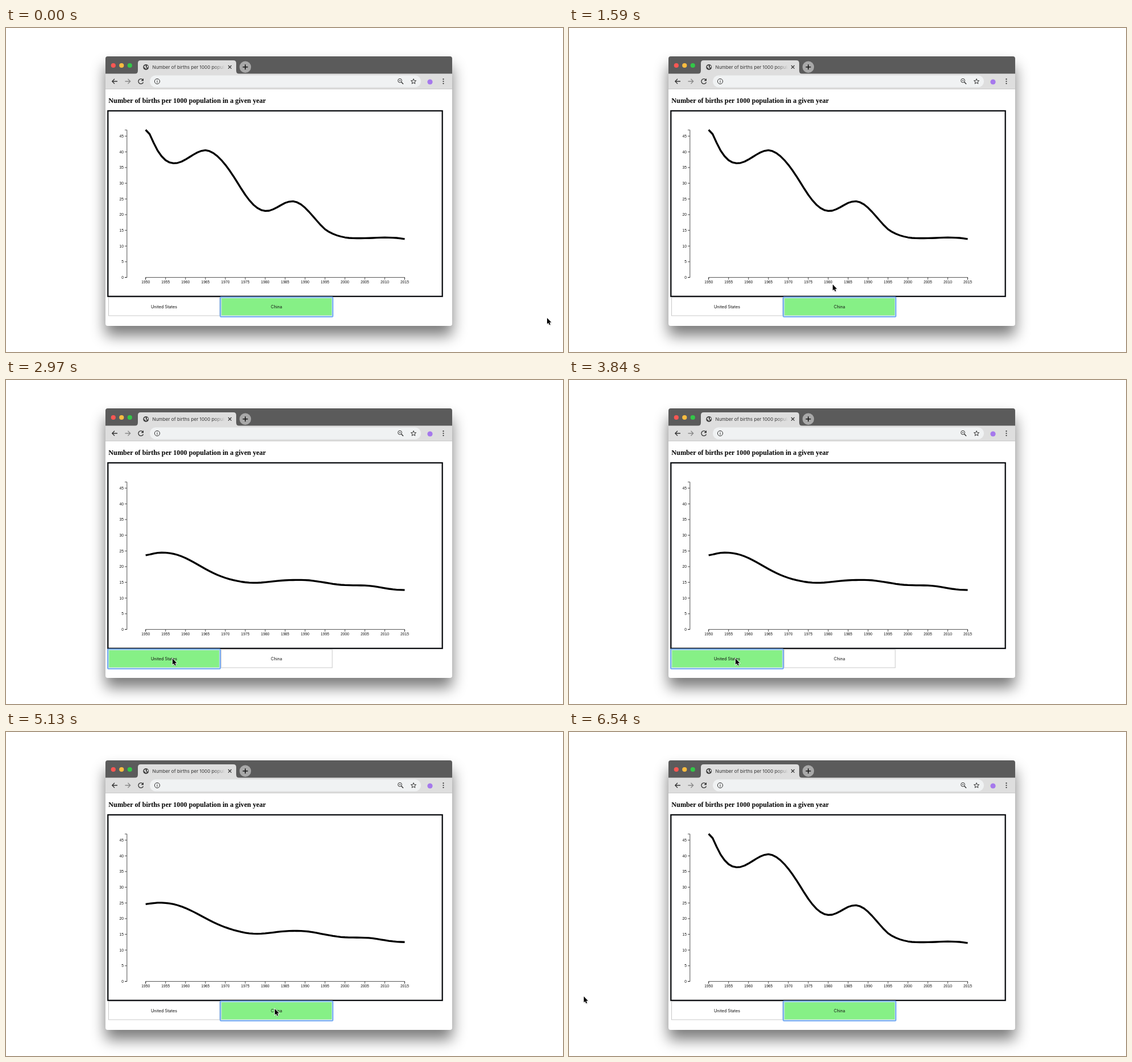
An HTML page for the animation above (6570 ms loop, 980 by 571 pixels).

```html
<!DOCTYPE html>
<html lang="en">
<head>
<meta charset="utf-8">
<title>Number of births per 1000 population</title>
<style>
  html, body { margin: 0; width: 100%; height: 100%; overflow: hidden; background: #fff; }
  svg { display: block; width: 980px; height: 571px; }
  .ui { font-family: Inter, Roboto, sans-serif; }
  .heading { font: bold 12.2px "Liberation Serif", serif; }
  .axis text { font: 6.7px "Liberation Sans", sans-serif; fill: #111; }
  .axis path { fill: none; stroke: #222; stroke-width: .8; }
  .icon { fill: none; stroke: #333; stroke-width: 1.3; }
  .label { font-size: 7.3px; text-anchor: middle; fill: #111; }
</style>
</head>
<body>
<svg viewBox="0 0 980 571">
  <defs>
    <filter id="blur" x="-20%" y="-20%" width="140%" height="140%"><feGaussianBlur stdDeviation="13"/></filter>
    <filter id="soft" x="-50%" y="-50%" width="200%" height="200%"><feGaussianBlur stdDeviation=".8"/></filter>
    <linearGradient id="fade" gradientUnits="userSpaceOnUse" x1="364" x2="386" y1="0" y2="0">
      <stop stop-color="#333"/><stop offset="1" stop-color="#333" stop-opacity="0"/>
    </linearGradient>
    <clipPath id="window"><rect x="175" y="50" width="610" height="475" rx="4"/></clipPath>
    <clipPath id="tabText"><rect x="256" y="58" width="129" height="22"/></clipPath>
    <path id="arrow" d="M0 0V10.6L2.4 8.4 4 12.2 5.8 11.4 4.2 7.7H7.5Z"/>
  </defs>

  <rect x="175" y="67" width="610" height="475" rx="4" opacity=".52" filter="url(#blur)"/>

  <g clip-path="url(#window)">
    <rect x="175" y="50" width="610" height="475" fill="#fff"/>
    <rect x="175" y="50" width="610" height="31" fill="#5b5b5b"/>
    <rect x="175" y="80.5" width="610" height="27" fill="#dedede"/>
    <path d="M175 107.5H785" stroke="#c9c9c9"/>
    <path d="M226 81Q232 81 232 75V62Q232 57 237 57H400Q405 57 405 62V75Q405 81 411 81Z" fill="#dedede"/>
  </g>

  <circle cx="188.8" cy="66" r="4.1" fill="#fc5753"/>
  <circle cx="203.3" cy="66" r="4.1" fill="#fdbc40"/>
  <circle cx="217.8" cy="66" r="4.1" fill="#33c748"/>

  <circle cx="246.2" cy="69" r="5" fill="#444"/>
  <path d="M242.5 68.5l2-2.5 2 .5-1 2 2 1.5-1 2.500-1.500-2ZM248 66l2 1v3l-2-1Z" fill="#dedede"/>
  <g class="ui">
    <text x="257.500" y="72" font-size="8.2" fill="url(#fade)" clip-path="url(#tabText)">Number of births per 1000 population</text>
    <text x="277.500" y="97.500" font-size="9.900" fill="#222">127.0.0.1<tspan fill="#62666a">:3000/__drafts/week8/lab8/line-4/</tspan></text>
  </g>
  <path class="icon" d="M391 66l5.600 5.600M396.600 66L391 71.600"/>
  <circle cx="421" cy="68.700" r="10.200" fill="#a8a8a8"/>
  <path class="icon" d="M416.500 68.700h9M421 64.200v9" style="stroke:#111;stroke-width:1.500"/>

  <g id="pill"></g>
  <path class="icon" d="M196 94H187M191 89.800L186.800 94 191 98.200"/>
  <path class="icon" d="M209.500 94H218.500M214.500 89.800L218.700 94 214.500 98.200" style="stroke:#888"/>
  <path class="icon" d="M240.700 91.200A4.400 4.400 0 1 0 241.500 95.500"/>
  <path d="M242 88.800V93.300H237.500Z" fill="#333"/>
  <g class="icon" style="stroke-width:1">
    <circle cx="266" cy="94" r="4.600"/><path d="M266 93.300V96.600M266 91.200v1.100"/>
    <circle cx="693" cy="92.700" r="3.400"/><path d="M695.500 95.200l3.500 3.500" style="stroke-width:1.500"/><path d="M691.500 92.700h3"/>
    <path id="star"/>
  </g>
  <circle cx="746" cy="95" r="4.600" fill="#a578ec"/>
  <g fill="#333"><circle cx="769.500" cy="90.200" r="1.100"/><circle cx="769.500" cy="94" r="1.100"/><circle cx="769.500" cy="97.800" r="1.100"/></g>

  <text class="heading" x="180.300" y="132">Number of births per 1000 population in a given year</text>
  <rect x="179.300" y="146" width="588.400" height="327" fill="none" stroke="#0b0d10" stroke-width="2.300"/>
  <g class="axis" id="axes"></g>
  <path id="curve" fill="none" stroke="#000" stroke-width="3.300" stroke-linejoin="round"/>

  <g class="ui" id="buttons"></g>

  <circle id="press" r="14.600" fill="#fff" fill-opacity=".25" stroke="#111" stroke-width="2.200"/>
  <g id="cursor">
    <use href="#arrow" x=".6" y="1.300" opacity=".35" filter="url(#soft)"/>
    <use href="#arrow" fill="#000" stroke="#fff" stroke-width="1.500" style="paint-order:stroke"/>
  </g>
</svg>

<script>
const LOOP = 6570, STEP = 30, FADE = 250;
const byId = id => document.getElementById(id);

function add(parent, tag, attrs, text) {
  const node = document.createElementNS("http://www.w3.org/2000/svg", tag);
  for (const key in attrs) node.setAttribute(key, attrs[key]);
  if (text !== undefined) node.textContent = text;
  parent.append(node);
  return node;
}

// Toolbar details
add(byId("pill"), "rect", { x: 253, y: 83.5, width: 477, height: 21, rx: 10.5, fill: "#f0f2f3" });
const starPoint = (_, i) => {
  const r = i % 2 ? 2.1 : 4.8, a = Math.PI * (i / 5 - .5);
  return [717 + r * Math.cos(a), 94.3 + r * Math.sin(a)].map(v => v.toFixed(2));
};
byId("star").setAttribute("d", "M" + Array.from({ length: 10 }, starPoint).join("L") + "Z");

// Axes
const yearX = year => 245.7 + (year - 1950) * 7.012;
const rateY = rate => 439.6 - rate * 5.533;
const axes = byId("axes");
add(axes, "path", { d: "M209 179.800H212.800V439.600H209" });
add(axes, "path", { d: `M${yearX(1950)} 443.500V439.600H${yearX(2015)}V443.500` });
for (let rate = 0; rate <= 45; rate += 5) {
  add(axes, "path", { d: `M209 ${rateY(rate)}H212.800` });
  add(axes, "text", { x: 207, y: rateY(rate) + 2.4, "text-anchor": "end" }, rate);
}
for (let year = 1950; year <= 2015; year += 5) {
  add(axes, "path", { d: `M${yearX(year)} 439.600V443.500` });
  add(axes, "text", { x: yearX(year), y: 449.6, "text-anchor": "middle" }, year);
}

// Heights for 1950, then every odd year; even years are interpolated.
function yearly([first, ...odd]) {
  const n = odd.length;
  const at = i => i < 0 ? 2 * odd[0] - odd[1] : i >= n ? 2 * odd[n - 1] - odd[n - 2] : odd[i];
  const out = [first];
  odd.forEach((y, i) => {
    out.push(y);
    if (i < n - 1) out.push((9 * (y + at(i + 1)) - at(i - 1) - at(i + 2)) / 16);
  });
  return out;
}
const china = yearly([179.5, 187, 216, 233, 238.4, 235.5, 227.5, 219.3, 215.4, 220.5, 232.8, 250.5,
  272, 294, 311.2, 320.8, 322, 316, 308.3, 305.4, 311, 324, 340, 354.6, 362.8, 367.5, 370,
  370.5, 370.4, 370, 369.4, 369.3, 370, 371.9]);
const states = yearly([308.8, 307.5, 304.7, 304.4, 306.3, 310.8, 317.3, 325, 333, 340.3, 346.3, 350.9,
  354.2, 356.5, 357.4, 357, 355.6, 354.1, 353, 352.5, 352.4, 353, 354.8, 357, 359.3, 361, 361.7,
  361.9, 362.2, 363.3, 365.6, 368, 369.6, 370.2]);

// Buttons
function makeButton(x, name) {
  const group = add(byId("buttons"), "g", {});
  const face = add(group, "rect", { x, y: 475, width: 195.5, height: 32, stroke: "#c8c8c8", "stroke-width": 1 });
  const ring = add(group, "g", { fill: "none" });
  add(ring, "rect", { x: x - 1.5, y: 474.3, width: 198, height: 34.7, rx: 1.5, stroke: "#78adf4", "stroke-width": 2.2 });
  add(ring, "rect", { x: x + .5, y: 476, width: 194.5, height: 31, stroke: "#cfe3fb", "stroke-width": .8 });
  add(group, "text", { x: x + 97.5, y: 493.8, class: "label" }, name);
  return (active, focused) => {
    face.setAttribute("fill", active ? "#86f086" : "#fff");
    face.setAttribute("stroke", active ? "#a9dcae" : "#c8c8c8");
    ring.setAttribute("visibility", focused ? "visible" : "hidden");
  };
}
const drawStates = makeButton(180.5, "United States");
const drawChina = makeButton(378.5, "China");

// Pointer: time, x, y
const path = [
  [0, 952, 511], [150, 952, 511], [660, 807, 508], [1320, 575, 468], [1590, 464, 452],
  [1980, 335, 472], [2400, 293, 491], [3960, 293, 491], [4350, 471, 488], [5010, 471, 488],
  [5100, 473, 488], [5600, 473, 488], [5940, 432, 473], [6540, 26, 466]
];
const clicks = [
  { down: 2640, focus: 2670, up: 2715 },
  { down: 4995, focus: 5025, up: 5075 }
];

const slope = (i, axis) => path[i] && path[i + 1]
  ? (path[i + 1][axis] - path[i][axis]) / (path[i + 1][0] - path[i][0]) : 0;
function tangent(i, axis) {
  const a = slope(i - 1, axis), b = slope(i, axis);
  if (i === path.length - 1) return a;
  return a * b <= 0 ? 0 : 2 * a * b / (a + b);
}
function pointer(t, axis) {
  let i = 0;
  while (i < path.length - 2 && t >= path[i + 1][0]) i++;
  const [a, b] = [path[i], path[i + 1]], span = b[0] - a[0];
  const u = Math.min(1, (t - a[0]) / span), v = 1 - u;
  return a[axis] * v * v * (1 + 2 * u) + b[axis] * u * u * (3 - 2 * u)
    + span * u * v * (tangent(i, axis) * v - tangent(i + 1, axis) * u);
}
function easeCubic(t) {
  const u = Math.max(0, Math.min(1, t));
  return u < .5 ? 4 * u ** 3 : 1 - 4 * (1 - u) ** 3;
}

function render(t) {
  const [toStates, toChina] = clicks;
  const mix = easeCubic((t - toStates.up) / FADE) - easeCubic((t - toChina.up) / FADE);
  const points = china.map((y, i) => yearX(1950 + i).toFixed(2) + " " + (y + (states[i] - y) * mix).toFixed(2));
  byId("curve").setAttribute("d", "M" + points.join("L"));

  const within = key => t >= toStates[key] && t < toChina[key];
  drawStates(within("up"), within("focus"));
  drawChina(!within("up"), !within("focus"));

  const x = pointer(t, 1), y = pointer(t, 2);
  byId("cursor").setAttribute("transform", `translate(${x} ${y})`);
  const press = byId("press");
  press.setAttribute("cx", x + .2);
  press.setAttribute("cy", y + 1.5);
  press.setAttribute("visibility", clicks.some(c => t >= c.down && t < c.up) ? "visible" : "hidden");
}

const start = performance.now();
function tick() {
  const t = (performance.now() - start) % LOOP;
  render(Math.floor(t / STEP) * STEP);
  requestAnimationFrame(tick);
}
tick();
</script>
</body>
</html>
```
